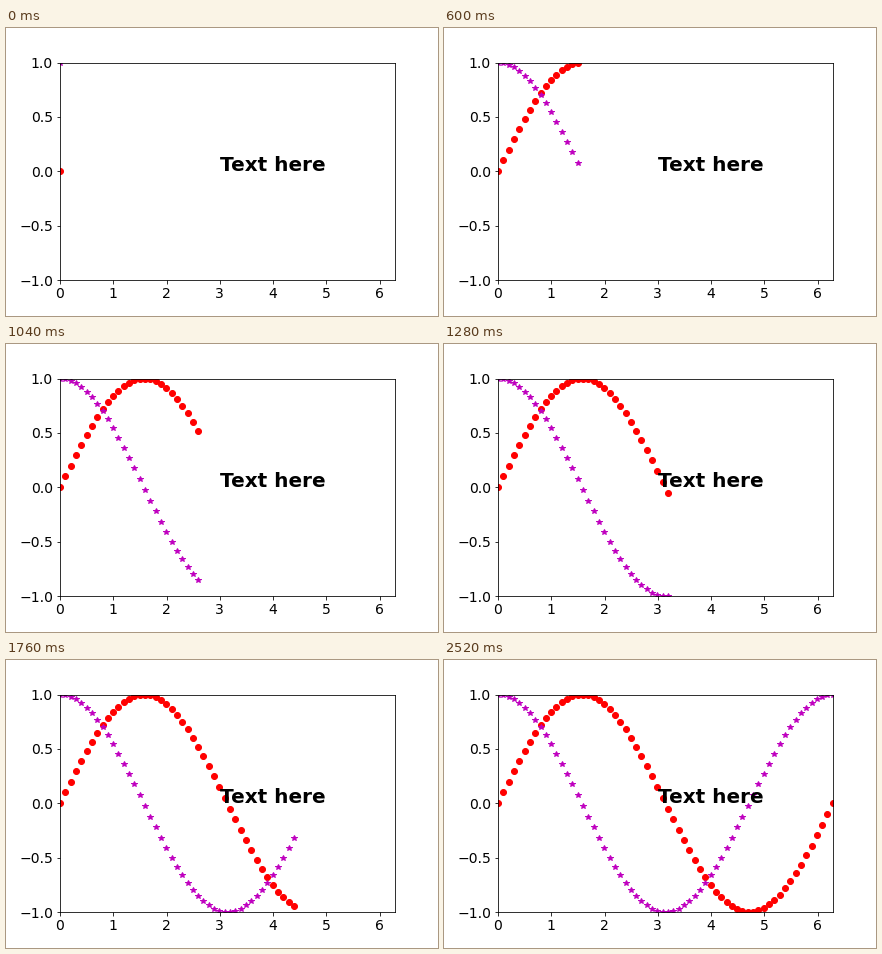
A matplotlib script for the animation above (2.56 s loop, 432x288 px).

```python
import numpy as np
import matplotlib.pyplot as plt
from matplotlib.animation import FuncAnimation

FRAMES = 64
INTERVAL = 40

plt.rcParams["font.family"] = "DejaVu Sans"

fig, ax = plt.subplots(figsize=(6, 4), dpi=72)
fig.subplots_adjust(left=0.125, right=0.9, bottom=0.125, top=0.88)
ax.set_xlim(0, 2 * np.pi)
ax.set_ylim(-1, 1)
ax.set_xticks(range(7))
ax.set_yticks(np.linspace(-1, 1, 5))
ax.tick_params(labelsize=14)
ax.text(3, 0, "Text here", fontsize=20, fontweight="bold")

x = np.linspace(0, 2 * np.pi, FRAMES)
sine, = ax.plot([], [], "ro")
cosine, = ax.plot([], [], "m*")


def update(frame):
    shown = x[:frame + 1]
    sine.set_data(shown, np.sin(shown))
    cosine.set_data(shown, np.cos(shown))
    return sine, cosine


anim = FuncAnimation(fig, update, frames=FRAMES, interval=INTERVAL,
                     init_func=lambda: update(0), repeat=True, repeat_delay=0)
plt.show()
```
